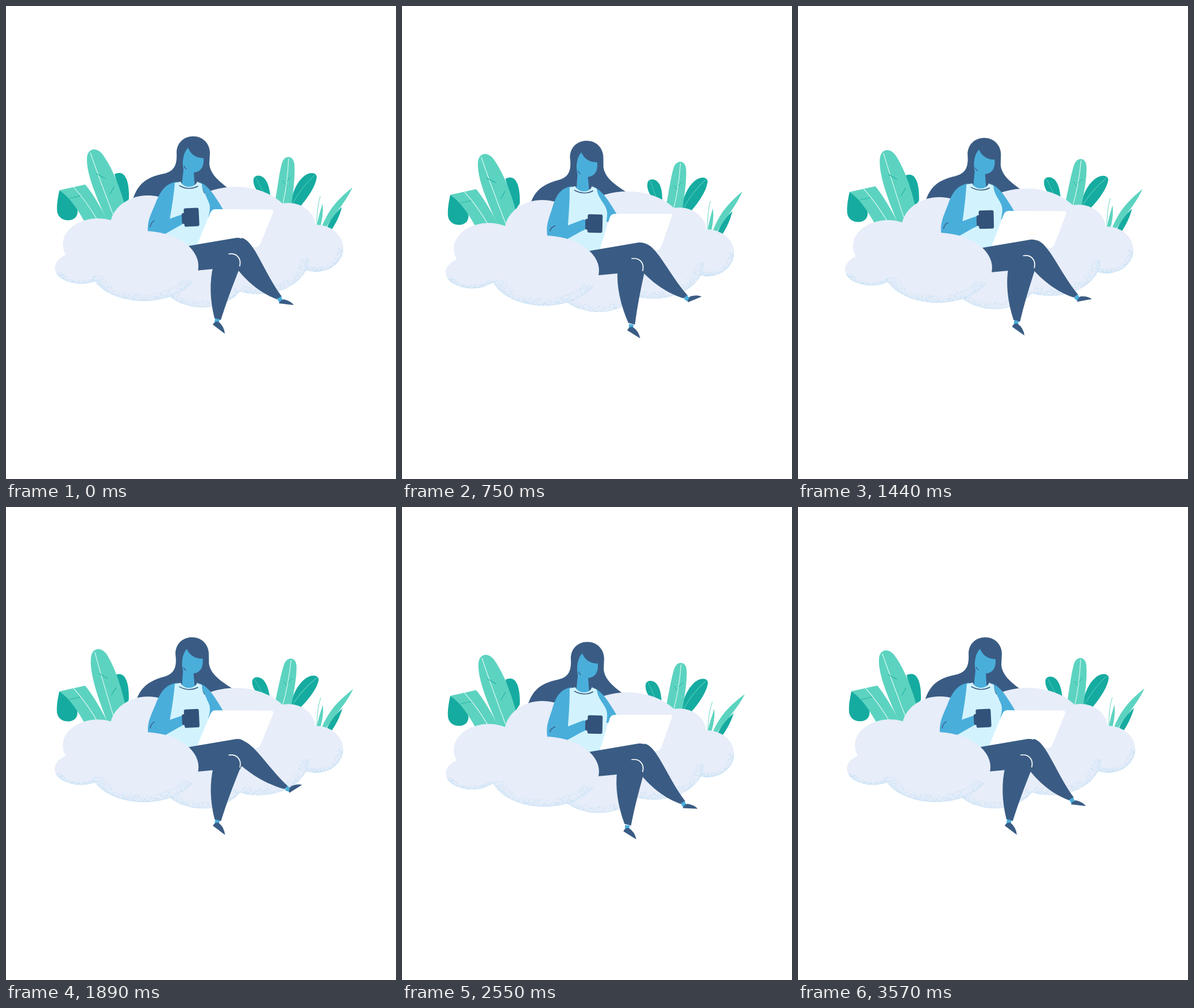
An HTML page with a canvas that plays this animation: 679 px wide and 824 px high, repeating every 3600 ms.

```html
<!DOCTYPE html>
<html lang="en">
<head>
<meta charset="utf-8">
<title>Working on a cloud</title>
<style>
html, body { margin: 0; width: 100%; height: 100%; overflow: hidden; background: #fff; }
canvas { display: block; }
</style>
</head>
<body>
<canvas id="stage" width="679" height="824"></canvas>
<script>
const ctx = document.getElementById('stage').getContext('2d');
const LOOP = 3600, STEP = 30, TAU = Math.PI * 2;
const NAVY = '#3a5c84', SKIN = '#4aaedb', DRESS = '#d2f3fe', CLOUD = '#e7edf9',
      GRAIN = '#bfdff4', MINT = '#5cd3c0', TEAL = '#16aba0', MUG = '#33527a';

let seed = 7;
const random = () => (seed = seed * 16807 % 2147483647) / 2147483647;

function fill(d, color) {
  ctx.fillStyle = color;
  ctx.fill(new Path2D(d));
}

function line(d, color, width = 1) {
  ctx.strokeStyle = color;
  ctx.lineWidth = width;
  ctx.lineCap = 'round';
  ctx.stroke(new Path2D(d));
}

function group(draw) {
  ctx.save();
  draw();
  ctx.restore();
}

function rotate(x, y, angle) {
  ctx.translate(x, y);
  ctx.rotate(angle);
  ctx.translate(-x, -y);
}

// Slides points sideways by k and shortens by m per pixel below y0.
const shear = (y0, k, m = 0) => ctx.transform(1, 0, k, 1 - m, -k * y0, m * y0);

// Blends the numbers of two paths that share a structure.
function morph(from, to, amount) {
  const target = to.match(/[\d.]+/g);
  let i = 0;
  return from.replace(/[\d.]+/g, n => +n + (target[i++] - n) * amount);
}

// A cloud puff, with speckled shade along the arc a0..a1 (in half turns).
function puff(x, y, rx, ry, drift, grains = 0, a0 = 0, a1 = 1) {
  const grain = new Path2D();
  for (let i = 0; i < grains; i++) {
    const a = (a0 + (a1 - a0) * random()) * Math.PI;
    const r = 1 - random() ** 2.6 * 0.2;
    grain.rect(x + rx * r * Math.cos(a) - 0.5, y + ry * r * Math.sin(a) - 0.5, 1, 1);
  }
  return bob => group(() => {
    ctx.translate(drift * bob, 0);
    ctx.beginPath();
    ctx.ellipse(x, y, rx, ry, 0, 0, TAU);
    ctx.fillStyle = CLOUD;
    ctx.fill();
    ctx.clip();
    ctx.fillStyle = GRAIN;
    ctx.fill(grain);
  });
}

const backPuffs = [
  puff(492, 385, 47, 42, -9.6),
  puff(400, 385, 100, 70, -8),
  puff(540, 422, 47, 41, -9.6, 420, 0, 0.7),
  puff(330, 430, 190, 70, 0),
  puff(440, 440, 87, 62, -2, 600, 0, 0.7),
  puff(342, 470, 75, 55, 0, 500, 0.15, 0.9),
  puff(131, 456, 46, 28, -9.6, 300, 0.2, 0.9),
  puff(160, 415, 61, 45, -9.6),
  puff(247, 385, 66, 55, -3)
];
const frontPuff = puff(240, 453, 95, 61, 8.6, 800, 0.15, 0.9);

function leftPlants(late) {
  fill('M189 293C206 284 215 302 214 336L205 350Z', TEAL);
  group(() => {
    rotate(195, 370, 0.07 * late);
    fill('M180 382C159 338 139 292 141 264C142 250 155 244 167 257C185 281 202 322 214 375Z', MINT);
    line('M147 256Q164 305 189 370', '#e6fbf7', 1.1);
    line('M157 292L172 300M181 328L188 315', TEAL);
  });
  fill('M93 321C90 335 88 347 89 358C92 376 115 377 122 367C132 352 112 333 93 321Z', TEAL);
  fill('M93 321L138 311C150 325 166 352 179 378L139 380C126 356 112 334 93 321Z', MINT);
  line('M118 316Q140 340 161 376', '#e6fbf7', 1.1);
  line('M111 335L129 331', TEAL, 0.8);
}

function rightPlants({ bob, half, late, sway }) {
  group(() => {
    rotate(455, 345, (5.5 * bob - 2 * half + 1.5 * sway) / 45);
    fill('M431 301C434 293 446 294 452 303C458 312 459 322 461 335L440 325C432 316 430 308 431 301Z', TEAL);
    line('M435 299L450 328', MINT, 0.8);
  });
  group(() => {
    rotate(500, 345, 0.08 * late);
    fill('M496 350C496 330 505 310 515 300C525 289 539 288 541 297C540 313 525 335 510 352Z', TEAL);
    line('M537 295Q516 314 500 342', MINT);
  });
  group(() => {
    rotate(482, 342, 0.06 * half);
    fill('M467 352C472 320 476 290 480 275C484 259 500 259 502 275C504 295 500 325 496 353Z', MINT);
    line('M492 266Q490 310 482 345', '#e6fbf7', 1.1);
    line('M481 304L487 311M489 305L496 298', TEAL, 0.8);
  });
  group(() => {
    rotate(555, 385, (1.5 * half - 2.4 * sway) / 80);
    line('M547 332Q541 350 541 386', MINT, 0.9);
    fill('M540 390C543 370 547 358 551 344C553 360 550 374 546 390Z', MINT);
    fill('M547 392C561 353 579 336 603 316C592 341 573 361 553 392Z', MINT);
    fill('M556 392C563 374 573 361 585 350C581 365 575 378 564 394Z', TEAL);
  });
}

function backHair(flick) {
  rotate(326, 255, -0.035 * flick);
  fill('M326 227C309 227 297 239 297 256C298 275 294 288 275 292C240 299 225 313 217 352' +
       'L250 365L380 350L408 333C380 312 356 298 354 275L355 256C355 240 343 227 326 227Z', NAVY);
}

function face() {
  fill('M317 247C322 260 333 265 344 265C345 279 340 289 327 290L329 322H305L309 285C306 270 309 255 317 247Z', SKIN);
  line('M310 279Q311 282 314 284', NAVY, 1.3);
}

function torso(bob) {
  group(() => {
    ctx.translate(-4.5 * bob, 0);
    fill('M337 307C353 313 362 328 379 356V365L350 370V335Z', SKIN);
  });
  group(() => {
    shear(330, 0.105 * bob);
    fill('M298 306C276 309 268 325 261 342C253 362 246 372 247 393L262 403L293 385Z', SKIN);
    fill('M294 308L304 306C309 318 328 318 333 306L341 310C341 324 349 332 353 342C357 352 354 358 352 370L345 424H276C282 385 291 345 294 308Z', DRESS);
    line('M302 313Q318 322 334 314', NAVY, 1.5);
  });
  fill(morph('M364 354L461 354.5Q467 355 465 360L443 414Q440 420 434 420L331 420L355 362Q358 354 364 354Z',
             'M371 354L467 354Q472 354 470 359L452 411Q449 417 443 417L345 417L362 361Q364 354 371 354Z', bob), '#fff');
  fill(morph('M250 400L281 372L304 364Q313 362 313 371Q312 379 300 384L272 400Z',
             'M257 400L288 375L316 364Q327 363 327 372Q326 380 312 385L285 400Z', bob), SKIN);
  line(morph('M251 385Q252 378 258 374', 'M258 384Q260 377 267 375', bob), NAVY, 1.4);
  group(() => {
    ctx.translate(14 * bob, 3.2 * bob);
    rotate(323, 368, -0.05 + 0.08 * bob);
    ctx.fillStyle = MUG;
    ctx.beginPath();
    ctx.roundRect(310, 352, 26, 32, 3);
    ctx.roundRect(306, 360, 10, 19, 3);
    ctx.fill();
  });
}

function shoe(x, y, angle, ankle, sole) {
  ctx.translate(x, y);
  ctx.rotate(angle);
  fill(ankle, SKIN);
  fill(sole, NAVY);
}

function legs({ bob, kick, sway }) {
  ctx.translate(13 * bob, 0);
  const lean = (17 * bob + 3.5 * sway) / 106;
  group(() => {
    shear(415, 0.135 * kick, 0.223 * kick);
    fill('M410 404C420 406 427 416 435 429C451 457 464 485 480 506L472 511C448 502 424 486 400 455Z', NAVY);
  });
  group(() => shoe(477 + 12.7 * kick, 509 - 21 * kick, -0.73 * kick - 0.1 * bob - 0.09 * sway,
    'M-5 1L2 -3L5 4L-1 8Z', 'M-2 9Q1 3 7 2Q19 5 24 12Z'));
  group(() => {
    shear(440, lean);
    fill('M361 452C354 480 355 512 363 544L374 547C384 515 395 486 407 456L405 440Z', NAVY);
  });
  fill('M300 421L400 404Q409 403 416 409L424 425L407 457L362 458L320 462Z', NAVY);
  line('M388 432C402 430 410 440 407 453', '#fff', 1.7);
  shoe(368 + lean * 106, 546 + 1.4 * bob, -0.1 * bob,
    'M-4 -2L4 0L2 7L-5 6Z', 'M-8 9Q-5 3 2 4Q12 12 13 25Z');
}

function frame(now) {
  const t = Math.floor(now % LOOP / STEP) * STEP;
  const turn = TAU * t / LOOP;
  const wave = n => (1 - Math.cos(n * turn)) / 2;
  const bob = wave(2), half = wave(1), flick = wave(3);
  const pose = { bob, half, late: half ** 4, kick: flick * (1 - bob / 2), sway: Math.sin(turn) };
  const head = () => {
    ctx.translate(-3 * bob, 0);
    rotate(318, 305, -0.04 * flick);
  };

  ctx.fillStyle = '#fff';
  ctx.fillRect(0, 0, 679, 824);
  group(() => {
    ctx.translate(0, 8.6 * bob);
    group(() => {
      ctx.translate(-9.6 * bob, 0);
      leftPlants(pose.late);
      rightPlants(pose);
    });
    group(() => { head(); backHair(flick); });
    backPuffs.forEach(draw => draw(bob));
    group(() => { head(); face(); });
    torso(bob);
    group(() => legs(pose));
    frontPuff(bob);
  });
  requestAnimationFrame(frame);
}
requestAnimationFrame(frame);
</script>
</body>
</html>
```
